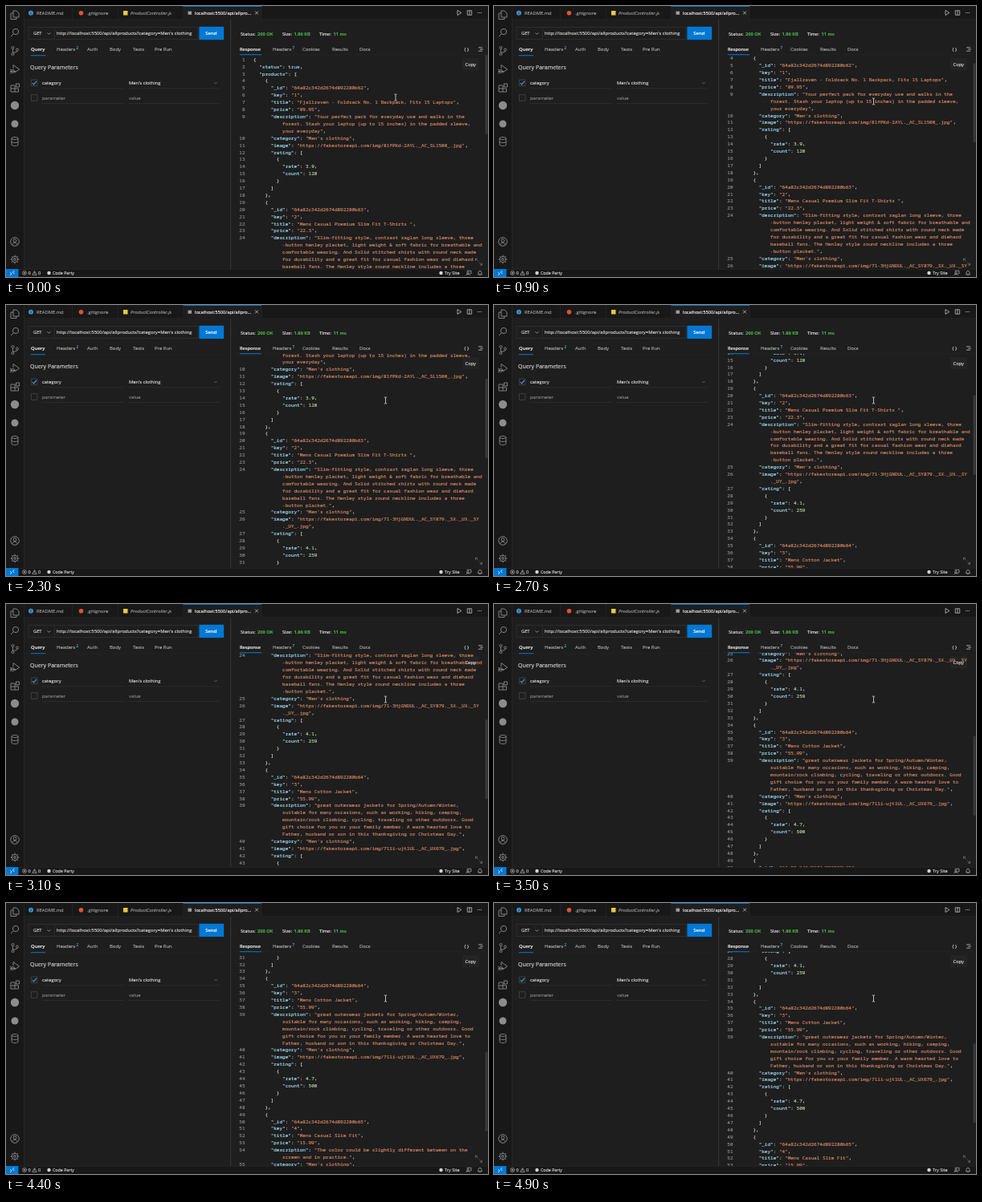
Recreate the animation shown at these times as an HTML page with a canvas. Size 600 by 338 pixels, loop 5 s.

```html
<!DOCTYPE html>
<html lang="en">
<head>
<meta charset="utf-8">
<title>API client</title>
<style>
html, body { margin: 0; width: 100%; height: 100%; overflow: hidden; background: #1e1e1e; }
canvas { display: block; width: 100vw; height: 100vh; }
</style>
</head>
<body>
<canvas id="stage"></canvas>
<script>
const W = 600, H = 338, LOOP = 5000;
const canvas = document.getElementById('stage');
const ctx = canvas.getContext('2d');
const dpr = window.devicePixelRatio || 1;
canvas.width = W * dpr;
canvas.height = H * dpr;

const SANS = '"Open Sans", "Noto Sans", sans-serif';
const MONO = '"Noto Sans Mono", "DejaVu Sans Mono", monospace';
const C = {
  bg: '#1e1e1e', side: '#181818', line: '#2b2b2b', icon: '#8c8c8c', text: '#d4d4d4',
  muted: '#a8a8a8', blue: '#0078d4', green: '#4cc24a', count: '#4fb0d0',
  key: '#9fdcf8', str: '#d98662', num: '#b9d2ac', bool: '#8cc4ea', punct: '#dcdcdc'
};

// Response pane metrics
const ROW = 8.906, CHAR = 3.608, CODE_X = 308, CODE_Y = 66.6;
const TOP = 61, BOTTOM = 328, NOTCH = 28.125, CONTENT = 722;

// [time, wheel notches]
const SCROLL = [
  [0, 0], [900, 1], [1100, 2], [1600, 3], [2400, 4], [2600, 5], [2800, 6],
  [2900, 7], [3100, 8], [3300, 9], [3500, 10], [3800, 11], [4000, 12], [4500, 11]
];

const IMG = 'https://fakestoreapi.com/img/';
const PRODUCTS = [
  {
    title: 'Fjallraven - Foldsack No. 1 Backpack, Fits 15 Laptops', price: '89.95',
    description: 'Your perfect pack for everyday use and walks in the\nforest. Stash your laptop (up to 15 inches) in the padded sleeve,\nyour everyday',
    image: '81fPKd-2AYL._AC_SL1500_.jpg', rate: 3.9, count: 120
  },
  {
    title: 'Mens Casual Premium Slim Fit T-Shirts ', price: '22.3',
    description: 'Slim-fitting style, contrast raglan long sleeve, three\n-button henley placket, light weight & soft fabric for breathable and\ncomfortable wearing. And Solid stitched shirts with round neck made\nfor durability and a great fit for casual fashion wear and diehard\nbaseball fans. The Henley style round neckline includes a three\n-button placket.',
    image: '71-3HjGNDUL._AC_SY879._SX._UX._SY\n._UY_.jpg', rate: 4.1, count: 259
  },
  {
    title: 'Mens Cotton Jacket', price: '55.99',
    description: 'great outerwear jackets for Spring/Autumn/Winter,\nsuitable for many occasions, such as working, hiking, camping,\nmountain/rock climbing, cycling, traveling or other outdoors. Good\ngift choice for you or your family member. A warm hearted love to\nFather, husband or son in this thanksgiving or Christmas Day.',
    image: '71li-ujtlUL._AC_UX679_.jpg', rate: 4.7, count: 500
  },
  {
    title: 'Mens Casual Slim Fit', price: '15.99',
    description: 'The color could be slightly different between on the\nscreen and in practice.',
    image: '71YXzeOuslL._AC_UY879_.jpg', rate: 2.1, count: 430
  }
];

function buildRows() {
  const rows = [];
  let n = 0;
  const punct = (indent, s) => rows.push({ n: ++n, indent, parts: [[s, C.punct]] });
  const field = (indent, key, value, tail = ',') => {
    const isStr = typeof value === 'string';
    const color = isStr ? C.str : typeof value === 'number' ? C.num : C.bool;
    const chunks = (isStr ? `"${value}"` : String(value)).split('\n');
    chunks.forEach((chunk, i) => {
      const parts = i ? [] : [[`"${key}"`, C.key], [': ', C.punct]];
      parts.push([chunk, color]);
      if (i === chunks.length - 1) parts.push([tail, C.punct]);
      rows.push({ n: i ? '' : ++n, indent: i ? indent + 4 : indent, parts });
    });
  };
  const open = (indent, key) =>
    rows.push({ n: ++n, indent, parts: [[`"${key}"`, C.key], [': [', C.punct]] });

  punct(0, '{');
  field(2, 'status', true);
  open(2, 'products');
  PRODUCTS.forEach((p, i) => {
    punct(4, '{');
    field(6, '_id', '64a82c342d2674d892280b6' + (i + 2));
    field(6, 'key', String(i + 1));
    field(6, 'title', p.title);
    field(6, 'price', p.price);
    field(6, 'description', p.description);
    field(6, 'category', "Men's clothing");
    field(6, 'image', IMG + p.image);
    open(6, 'rating');
    punct(8, '{');
    field(10, 'rate', p.rate);
    field(10, 'count', p.count, '');
    punct(8, '}');
    punct(6, ']');
    punct(4, i < PRODUCTS.length - 1 ? '},' : '}');
  });
  punct(2, ']');
  punct(0, '}');
  return rows;
}
const ROWS = buildRows();

// y is the vertical middle of the capitals; a hairline stroke firms up the small type
function text(s, x, y, color = C.text, size = 5.9, style = '', family = SANS) {
  ctx.font = `${style} ${size}px ${family}`;
  ctx.fillStyle = ctx.strokeStyle = color;
  ctx.lineWidth = 0.16;
  ctx.lineJoin = 'round';
  ctx.fillText(s, x, y + size * 0.357);
  ctx.strokeText(s, x, y + size * 0.357);
}
function rect(x, y, w, h, color) {
  ctx.fillStyle = color;
  ctx.fillRect(x, y, w, h);
}
function box(x, y, w, h, color, lw = 0.6) {
  ctx.strokeStyle = color;
  ctx.lineWidth = lw;
  ctx.strokeRect(x, y, w, h);
}
function dot(x, y, r, color) {
  ctx.fillStyle = color;
  ctx.beginPath();
  ctx.arc(x, y, r, 0, Math.PI * 2);
  ctx.fill();
}
function path(d, color = C.icon, lw = 0.9, x = 0, y = 0) {
  ctx.save();
  ctx.translate(x, y);
  ctx.strokeStyle = color;
  ctx.lineWidth = lw;
  ctx.stroke(new Path2D(d));
  ctx.restore();
}
const ring = (x, y, r) => `M${x + r} ${y}a${r} ${r} 0 1 0 ${-2 * r} 0a${r} ${r} 0 1 0 ${2 * r} 0`;
const chevron = (x, y, color) => path('M-2 -1L0 1L2 -1', color, 0.6, x, y);

function activityBar() {
  rect(0, 0, 22, BOTTOM, C.side);
  rect(22, 0, 0.6, BOTTOM, C.line);
  const icon = (d, y) => path(d, C.icon, 0.9, 11, y);
  icon('M-2 -5H2L5 -2V3H-2ZM-2 -2H-5V5.5H2V3', 11);
  icon(ring(1, -1, 3.6) + 'M-1.6 1.6L-5 5', 33);
  icon(ring(-2.5, -4, 1.5) + ring(-2.5, 4, 1.5) + ring(3, -1.5, 1.5) + 'M-2.5 -2.5V2.5M3 0C3 2 0 1.5 -2.5 2.5', 56);
  icon('M-2 -1V-5.5L5.5 0L0 4' + ring(-2.5, 2.5, 2) + 'M-6 0L-4.5 1M-6 5L-4.5 4M-6 2.5H1', 79);
  icon('M-5 -3H0V5H-5ZM-5 1H4.5V5H0M1.5 -5H5.5V-1H1.5Z', 102);
  dot(11, 124, 5.2, C.icon);
  dot(11, 147, 4.5, C.icon);
  icon('M-4 -4C-4 -6 4 -6 4 -4C4 -2 -4 -2 -4 -4V4C-4 6 4 6 4 4V-4M-4 0C-4 2 4 2 4 0', 169);
  icon(ring(0, 0, 5.3) + ring(0, -1.4, 1.9) + 'M-3.4 4C-2.6 0.2 2.6 0.2 3.4 4', 294);
  icon(ring(0, 0, 3.7) + ring(0, 0, 1.4), 316);
  for (let i = 0; i < 8; i++) {
    const c = Math.cos(i * Math.PI / 4), s = Math.sin(i * Math.PI / 4);
    icon(`M${c * 3.7} ${s * 3.7}L${c * 5.4} ${s * 5.4}`, 316);
  }
}

function tabBar() {
  rect(22.6, 0, W, 17, C.side);
  rect(22.6, 16.6, W, 0.5, C.line);
  [82, 139, 220, 318].forEach(x => rect(x, 0, 0.5, 17, C.line));
  rect(220.5, 0, 97.5, 17.2, C.bg);
  rect(220.5, 0, 97.5, 0.9, C.blue);
  dot(31, 8.7, 2.9, '#3b9bd8');
  rect(30.6, 8, 0.8, 2.4, C.side);
  rect(30.6, 6.8, 0.8, 0.7, C.side);
  text('README.md', 38, 8.5, '#9d9d9d', 5.8);
  dot(93.5, 8.7, 2.8, '#e0532f');
  text('.gitignore', 101, 8.5, '#9d9d9d', 6);
  rect(146, 6, 5.5, 5.5, '#e8c93c');
  text('ProductController.js', 155, 8.5, '#9d9d9d', 5.85, 'italic');
  rect(226.5, 6.6, 4.6, 4.2, '#9a9a9a');
  text('localhost:5500/api/allpro...', 235, 8.5, '#f0f0f0', 5.7);
  path('M-2 -2L2 2M2 -2L-2 2', C.text, 0.7, 312, 8.5);
  path('M-2 -3L2.8 0L-2 3Z', C.text, 0.7, 564, 8.5);
  path('M-2.7 -2.7H2.7V2.7H-2.7ZM0 -2.7V2.7', C.text, 0.7, 577, 8.5);
  [-2, 0, 2].forEach(d => dot(589.5 + d, 8.5, 0.55, C.text));
}

function requestPane() {
  box(28, 26.5, 211, 15, '#383838');
  rect(60, 26.5, 0.5, 15, '#383838');
  text('GET', 34, 34.3, C.text, 5.7);
  chevron(53.5, 34.3, C.text);
  text("http://localhost:5500/api/allproducts?category=Men's clothing", 63, 34.2, C.text, 5.87);
  rect(240.4, 25.8, 30.8, 16.3, C.blue);
  text('Send', 248.3, 34.2, '#fff', 6, '600');

  text('Query', 31, 54, '#f0f0f0', 5.9, '600');
  [['Headers', 63], ['Auth', 101], ['Body', 129], ['Tests', 158], ['Pre Run', 185]]
    .forEach(([s, x]) => text(s, x, 54, C.muted, 5.95));
  text('2', 87.6, 52, C.count, 4.6);
  rect(28, 61.8, 244, 0.4, C.line);
  rect(31, 61.2, 18, 1, C.blue);

  text('Query Parameters', 30, 76.8, C.text, 7.03);
  [['category', "Men's clothing", 96, C.text], ['parameter', 'value', 114.7, '#828282']]
    .forEach(([key, value, y, color]) => {
      box(31.4, y - 4, 7.6, 7.6, '#555');
      text(key, 45, y, color);
      text(value, 153, y, color);
      rect(45, y + 6.6, 102, 0.5, '#363636');
      rect(152, y + 6.6, 114, 0.5, '#363636');
    });
  path('M-2.4 0L-0.6 2L2.6 -2.2', '#3ea6ff', 1.1, 35.2, 96);
  chevron(261, 96, '#777');
}

function responseHead() {
  rect(279, 17, 1.2, BOTTOM - 17, '#353535');
  [['Status:', 292, '200 OK', 313], ['Size:', 344, '1.86 KB', 358.5], ['Time:', 390, '11 ms', 407.5]]
    .forEach(([label, x, value, vx]) => {
      text(label, x, 34.6, C.text, 5.6, '600');
      text(value, vx, 34.6, C.green, 5.7, '600');
    });
  text('Response', 291, 54, '#f0f0f0', 5.6, '600');
  [['Headers', 332], ['Cookies', 369], ['Results', 406], ['Docs', 440]]
    .forEach(([s, x]) => text(s, x, 54, C.muted, 5.95));
  text('7', 356.4, 52, C.count, 4.6);
  text('{ }', 570.3, 54, C.text, 5.8);
  path('M-3 -2.2H2M-1 0H3M-3 2.2H2', C.text, 0.7, 591, 54);
  rect(285, 60.7, 311, 0.4, C.line);
  rect(291, 60.2, 27, 1, C.blue);
}

function responseBody(scroll) {
  ctx.save();
  ctx.beginPath();
  ctx.rect(281, TOP, W - 281, BOTTOM - TOP);
  ctx.clip();
  rect(568, 65, 21, 15, '#242424');
  text('Copy', 571.5, 72.5, C.text, 5.8);
  ROWS.forEach((row, i) => {
    const y = CODE_Y + i * ROW - scroll;
    if (y < TOP - ROW || y > BOTTOM + ROW) return;
    const mono = (s, x, color) => text(s, x, y, color, 6.013, '', MONO);
    const num = String(row.n);
    mono(num, 297.5 - num.length * CHAR, '#8c8c8c');
    let x = CODE_X + row.indent * CHAR;
    row.parts.forEach(([s, color]) => {
      mono(s, x, color);
      x += s.length * CHAR;
    });
  });
  const view = BOTTOM - TOP;
  rect(596.6, TOP + scroll * view / CONTENT, 3, view * view / CONTENT, '#393939');
  ctx.restore();
}

function statusBar() {
  rect(0, BOTTOM, W, H - BOTTOM, C.side);
  rect(0, BOTTOM, W, 0.5, C.line);
  rect(0, BOTTOM, 15.5, H - BOTTOM, C.blue);
  path('M-2.6 -1L-0.6 1L-2.6 3M2.6 -3L0.6 -1L2.6 1', '#fff', 0.8, 7.8, 333);
  path(ring(0, 0, 2.4) + 'M-1 -1L1 1M1 -1L-1 1', C.text, 0.6, 23, 333);
  text('0', 27.5, 333, C.text, 5.5);
  path('M0 -2.5L2.7 2.3H-2.7ZM0 -0.8V0.8', C.text, 0.6, 35.5, 333);
  text('0', 40, 333, C.text, 5.5);
  dot(53.5, 333, 2.2, C.text);
  text('Code Party', 58, 333, C.text, 5.3);
  dot(541.5, 333, 2.2, C.text);
  text('Try Site', 546, 333, C.text, 5.5);
  path(ring(-1, 0, 1.3) + 'M-3.4 3C-3 1 1 1 1.4 3M-2.5 -2.7H3V0.8H1.5', C.text, 0.6, 576, 333);
  path('M-2.6 1.7C-1.4 0 -2.4 -2.6 0 -2.8C2.4 -2.6 1.4 0 2.6 1.7ZM-0.8 2.6H0.8', C.text, 0.6, 590, 333);
}

function pointer(t) {
  const k = Math.min(1, Math.max(0, (t - 50) / 550));
  const e = k * k * (3 - 2 * k);
  const x = 485 - 12.5 * e, y = 114 + 5 * e;
  path('M-1.6 -4H-0.5L0 -3.4L0.5 -4H1.6M0 -3.4V3.4M-1.6 4H-0.5L0 3.4L0.5 4H1.6', '#e6e6e6', 0.8, x, y);
}

function draw(t) {
  ctx.setTransform(dpr, 0, 0, dpr, 0, 0);
  rect(0, 0, W, H, C.bg);
  let notches = 0;
  for (const [at, n] of SCROLL) if (t >= at) notches = n;
  tabBar();
  activityBar();
  requestPane();
  responseHead();
  responseBody(notches * NOTCH);
  statusBar();
  path('M-4 -1.4V-4H-1.4M-4 -4L-0.8 -0.8M4 1.4V4H1.4M4 4L0.8 0.8', '#808080', 0.7, 588.5, 319.2);
  pointer(t);
}

const start = performance.now();
function frame() {
  draw((performance.now() - start) % LOOP);
  requestAnimationFrame(frame);
}
frame();
</script>
</body>
</html>
```
